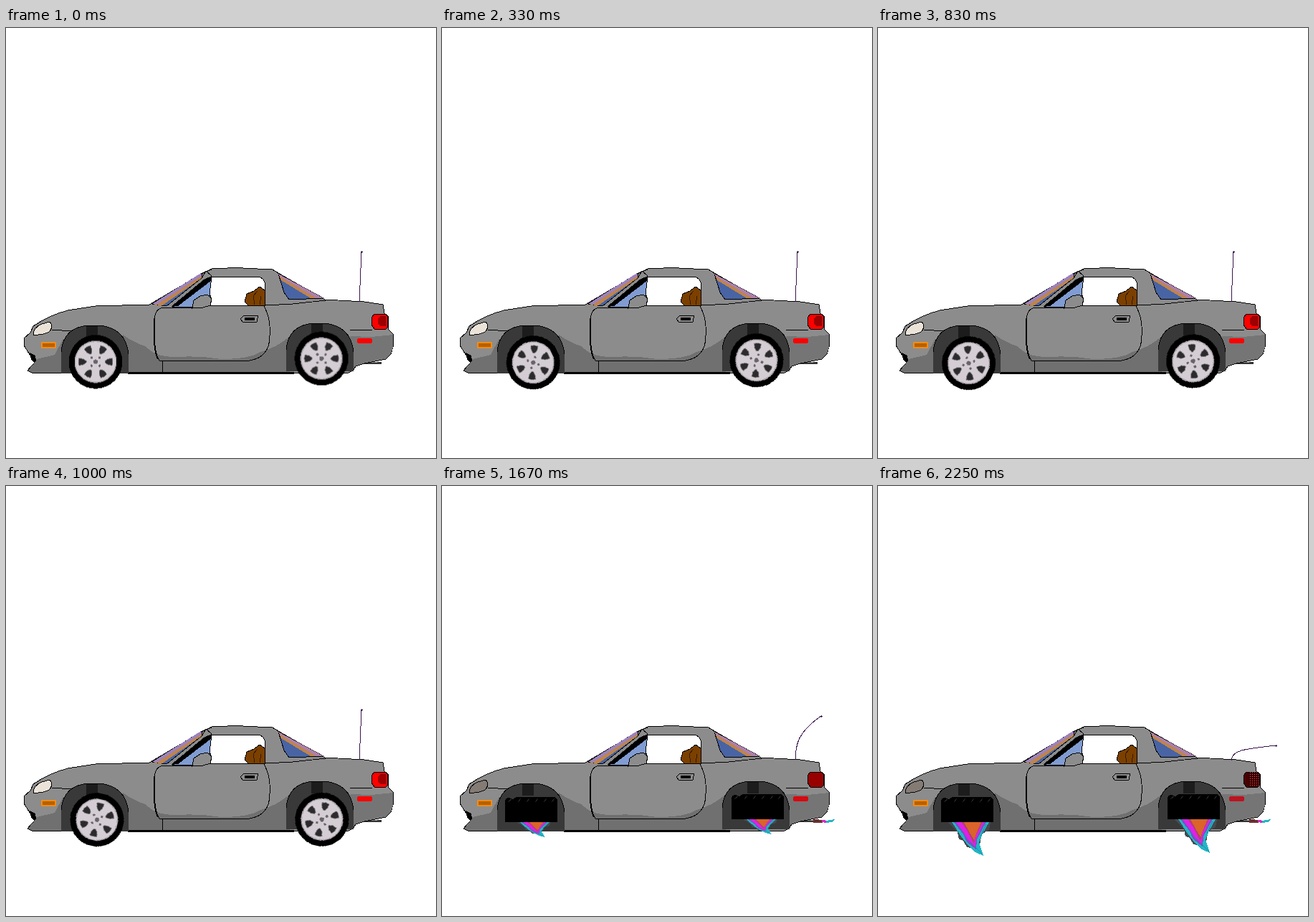
Recreate the animation shown at these times as an HTML page without scripts. Size 600 by 600 pixels, loop 2330 ms.

```html
<!DOCTYPE html>
<html lang="en">
<head>
<meta charset="utf-8">
<title>Hover roadster</title>
<style>
html, body { margin: 0; width: 100%; height: 100%; overflow: hidden; background: #fff; }
svg { display: block; width: 100vw; height: 100vh; shape-rendering: crispEdges; }
.line { fill: none; stroke: #000; }
.edge { stroke: #000; }

/* one loop is 28 steps */
.wheel, .drift, .tilt, .cap, .pod, .jet, .aerial, .head, .tail, .dots, .side, .pipe {
  animation: 2330ms step-end -3.5ms infinite;
}
.spin { animation: spin 582.5ms steps(7) -3.5ms infinite; }
.wheel { animation-name: wheel; }
.drift { animation-name: drift; }
.tilt { animation-name: tilt; transform-origin: 125px 429px; }
.cap { animation-name: cap; transform-origin: 128px 475px; }
.pod { animation-name: pod; }
.jet { animation-name: jet; transform-origin: 130px 469px; }
.aerial { animation-name: aerial; }
.head { animation-name: head; }
.tail { animation-name: tail; }
.dots { animation-name: dots; }
.side { animation-name: side; }
.pipe { animation-name: pipe; }

@keyframes spin { to { transform: rotate(-360deg); } }
@keyframes wheel { 0% { visibility: visible; } 53.571%, 100% { visibility: hidden; } }
@keyframes drift {
  0% { transform: none; }
  3.571% { transform: translate(-1px, 1px); }
  14.286% { transform: translate(-2px, 2px); }
  28.571% { transform: translate(-1px, 3px); }
  42.857%, 100% { transform: translate(0, 4px); }
}
@keyframes tilt {
  0% { visibility: hidden; transform: none; }
  53.571% { visibility: visible; transform: scaleY(1.15); }
  57.143% { visibility: visible; transform: none; }
  60.714% { visibility: visible; transform: scaleY(.9); }
  64.286% { visibility: visible; transform: scaleY(.8); }
  67.857% { visibility: visible; transform: scaleY(.72); }
  71.429%, 100% { visibility: hidden; transform: none; }
}
@keyframes cap {
  0%, 53.571% { transform: translateY(-6px) scaleY(1.25); }
  57.143% { transform: none; }
  60.714% { transform: translateY(4px) scaleY(.7); }
  64.286% { transform: translateY(8px) scaleY(.4); }
  67.857%, 100% { transform: translateY(11px) scaleY(.15); }
}
@keyframes pod { 0% { visibility: hidden; } 71.429%, 100% { visibility: visible; } }
@keyframes jet {
  0%, 71.429% { transform: scale(.8, .45); }
  75% { transform: none; }
  78.571% { transform: scale(.97, .92); }
  82.143% { transform: none; }
  85.714% { transform: scale(.97, .92); }
  89.286% { transform: none; }
  92.857% { transform: scale(.97, .92); }
  96.429%, 100% { transform: none; }
}
@keyframes aerial {
  0%, 60.714% { d: path("M493 383C494 360 495 336 496 312"); animation-timing-function: steps(4); }
  75% { d: path("M493 383C493 360 497 346 540 324"); animation-timing-function: steps(2); }
  82.143% { d: path("M493 383C492 364 502 360 549 335"); animation-timing-function: steps(4); }
  96.429%, 100% { d: path("M493 383C494 368 512 367 555 362"); }
}
@keyframes head {
  0% { fill: #ebe3d8; }
  53.571% { fill: #b8ada2; }
  57.143% { fill: #87796c; }
  71.429%, 100% { fill: #837b74; }
}
@keyframes tail {
  0% { fill: #f00; }
  60.714% { fill: #d00000; }
  67.857% { fill: #980000; }
  75% { fill: #6c0000; }
  82.143%, 100% { fill: #4b0000; }
}
@keyframes dots {
  0% { opacity: 0; }
  57.143% { opacity: .2; }
  60.714% { opacity: 0; }
  89.286% { opacity: .5; }
  96.429%, 100% { opacity: 1; }
}
@keyframes side { 0% { fill: #f00; } 64.286% { fill: #d80810; } 75%, 100% { fill: #bc1420; } }
@keyframes pipe { 0%, 53.571% { transform: none; } 57.143%, 100% { transform: translateX(6px); } }
</style>
</head>
<body>
<svg viewBox="0 0 600 600">
<defs>
  <pattern id="grid" width="3" height="3" patternUnits="userSpaceOnUse">
    <path d="M0 0h1v1h-1z" fill="#c46060"/>
    <path d="M1 1h2v1h-2z" fill="#200000"/>
  </pattern>
  <marker id="tip" markerWidth="3" markerHeight="3" refX="1.5" refY="1.5" markerUnits="userSpaceOnUse">
    <path d="M0 1h3v1h-3zM1 0h1v3h-1z" fill="#301048"/>
  </marker>
  <path id="hole" d="M-5 -23Q0 -25 5 -23L4 -17L1 -13H-1L-4 -17Z"/>
  <circle id="nut" cy="-8" r="1.7"/>
  <g id="disc">
    <circle r="37.5"/>
    <circle r="29.5" fill="#aaa4aa"/>
    <circle r="28" fill="#d4ced4"/>
    <g fill="#2c2a2c" stroke="#777" stroke-width=".8">
      <use href="#hole" transform="rotate(30)"/>
      <use href="#hole" transform="rotate(90)"/>
      <use href="#hole" transform="rotate(150)"/>
      <use href="#hole" transform="rotate(210)"/>
      <use href="#hole" transform="rotate(270)"/>
      <use href="#hole" transform="rotate(330)"/>
    </g>
    <g fill="#686468">
      <circle r="3"/>
      <use href="#nut" transform="rotate(45)"/>
      <use href="#nut" transform="rotate(135)"/>
      <use href="#nut" transform="rotate(225)"/>
      <use href="#nut" transform="rotate(315)"/>
    </g>
  </g>
  <g id="arch">
    <path d="M77 482V452Q80 416 118 415H128Q167 417 171 455V482Z" fill="#393939"/>
    <path d="M112 416H128V432H112Z" fill="#1c1c1c"/>
    <path class="line" d="M77 452Q80 416 118 415H128Q167 417 171 455"/>
  </g>
  <g id="tyre">
    <path d="M105 487H155Q150 494 130 494Q112 494 105 487Z" fill="#707070"/>
    <path d="M92 488L87 472V452Q92 429 124 429Q159 430 162 462L157 488Z"/>
  </g>
  <path id="rim" d="M105 488Q96 470 106 462Q114 456 129 456Q145 456 152 463Q161 473 152 488Z" fill="#d2ccd2"/>
  <g id="slab">
    <path d="M88 469V440Q88 435 94 435L99 437L104 434H157L161 438V469Z"/>
    <path d="M92 441L98 436M106 441L110 436M118 441L122 436M130 441L134 436M142 441L146 436M153 441L157 436" fill="none" stroke="#282828"/>
  </g>
  <g id="flame">
    <path d="M98 469L111 483L113 493L119 495L124 504L134 506L143 498L144 486L155 480L157 469Z" fill="#444b50"/>
    <path d="M103 469L116 489L126 502L136 511L147 516L141 497L146 485L155 469Z" fill="#22b6c6"/>
    <path d="M106 469L119 486L124 497L137 507L138 493L151 469Z" fill="#7650c4"/>
    <path d="M109 469L120 484L125 493L136 504L137 492L148 469Z" fill="#e020e8"/>
    <path d="M116 469L124 480L134 500L136 489L146 469Z" fill="#b04070"/>
    <path d="M120 469L127 482L134 494L138 483L144 469Z" fill="#da642a"/>
    <path d="M136 504L146 514M151 472L143 489" fill="none" stroke="#248ca8"/>
  </g>
</defs>

<!-- exhaust -->
<g class="pipe"><path d="M490 466H524V469H490Z" fill="#333"/><path d="M494 466H518" fill="none" stroke="#888"/></g>
<g class="pod">
  <path d="M518 465L534 466L531 470H518Z" fill="#6a3030"/>
  <path d="M530 466L540 467L536 470L530 469Z" fill="#d030c0"/>
  <path d="M536 467L548 465L544 469L536 470Z" fill="#28b4c4"/>
</g>

<!-- body -->
<path class="edge" fill="#8c8c8c" d="M36 481L30 478L36 471L41 466L34 457L25 443V433L34 425L38 416Q60 401 86 394L125 388L200 386L273 343L287 336L320 334.5L372 337L380 342L445 379L500 382L526 386L528 398L533 402V420L540 427V445L537 455L530 462L500 468L488 472L484 478L478 481Z"/>
<path d="M163 428Q180 440 195 444Q208 460 240 459Q270 457 300 462Q340 462 355 452Q378 446 396 430V480H163Z" fill="#707070"/>
<path d="M43 462L68 456L80 433V481H37L31 478L37 471Z" fill="#707070"/>
<path d="M480 430L510 431L540 428V445L537 455L530 461L500 467L488 471L482 479Z" fill="#757575"/>
<path d="M33 453L41 457L42 465L39 467L35 462Z"/>
<path class="line" d="M36 481L30 478L36 471M64 421L92 423M480 421L511 422M284 387H362L400 385L446 380"/>
<path d="M170 480H402V483H170Z"/>

<!-- glass -->
<path d="M204 385L273 342L274 348L224 388Z" fill="#4864a4" class="edge"/>
<path d="M206 386L273 345L273 349L218 387Z" fill="#c08448"/>
<path d="M204 385L272 342L273 346L212 385Z" fill="#9c82ba"/>
<path d="M232 389L287 348L285 373L262 390Z" fill="#809cd2" class="edge"/>
<path d="M230 389L276 351L287 346V352L240 388Z"/>
<path d="M274 348L279 339L287 346M274 342L287 337" class="line"/>
<path d="M287 347H352Q362 349 362 362L360 387H284L287 378L284 371Z" fill="#fff" class="edge"/>
<path d="M333 382L336 371L346 367L354 361L361 366V387H338Z" fill="#7b4000" class="edge"/>
<path d="M347 386L345 374L351 367M354 386L356 374" fill="none" stroke="#351900"/>
<path d="M380 343L443 377L395 379L388 369Z" fill="#4864a4" class="edge"/>
<path d="M381 345L435 377H425L384 352Z" fill="#c08448"/>
<path d="M380 343L443 377H433L382 347Z" fill="#ad80aa"/>

<!-- door -->
<path class="line" d="M262 390H220Q208 391 207 407V438Q208 455 214 464H340C358 461 368 450 368 430C369 408 366 400 360 388M218 464V481"/>
<path class="line" stroke-width="2" d="M207 405V438Q208 453 212 462"/>
<path d="M260 391L262 380L271 374L281 372L287 378L285 387L275 390Z" fill="#8c8c8c" class="edge"/>
<path d="M327 406L332 401H352L350 410H330Z" fill="#8c8c8c" class="edge"/>
<path d="M333 404H347V408H333Z"/>

<!-- lamps -->
<path class="head edge" d="M38 428Q38 418 50 413L61 410Q67 417 60 424Q50 429 38 428Z"/>
<path d="M50 438.500H69V445.500H50Z" fill="#b86000" stroke="#f08c18" stroke-width="2"/>
<path class="tail edge" d="M514 399H530L532 402V418L530 420H514L510 414V404Z"/>
<path class="wheel" d="M522 402H530V416H522L519 412V406Z" fill="#9c0000"/>
<path class="dots" d="M517 399H530L532 402V418L530 420H517Z" fill="url(#grid)"/>
<rect class="side" x="490" y="433" width="21" height="7" rx="3"/>
<path class="aerial" d="M493 383C494 360 495 336 496 312" fill="none" stroke="#38144c" marker-end="url(#tip)"/>

<!-- wheels -->
<use href="#arch"/>
<use href="#arch" transform="translate(314 -3)"/>
<g class="wheel">
  <g transform="translate(126 466.500)"><g class="spin"><use href="#disc" x="-1" y="-.7"/></g></g>
  <g class="drift"><g transform="translate(440.500 461.500)"><g class="spin"><use href="#disc" x="-.3" y="-.3"/></g></g></g>
</g>

<!-- folding wheels -->
<g class="tilt"><use href="#tyre"/><g class="cap"><use href="#rim"/></g></g>
<g transform="translate(315 -2)">
  <g class="tilt"><use href="#tyre"/><g class="cap"><use href="#rim"/></g></g>
</g>

<!-- hover jets -->
<g class="pod"><use href="#slab"/><g class="jet"><use href="#flame"/></g></g>
<g transform="translate(316 -4)">
  <g class="pod"><use href="#slab"/><g class="jet"><use href="#flame"/></g></g>
</g>
</svg>
</body>
</html>
```
